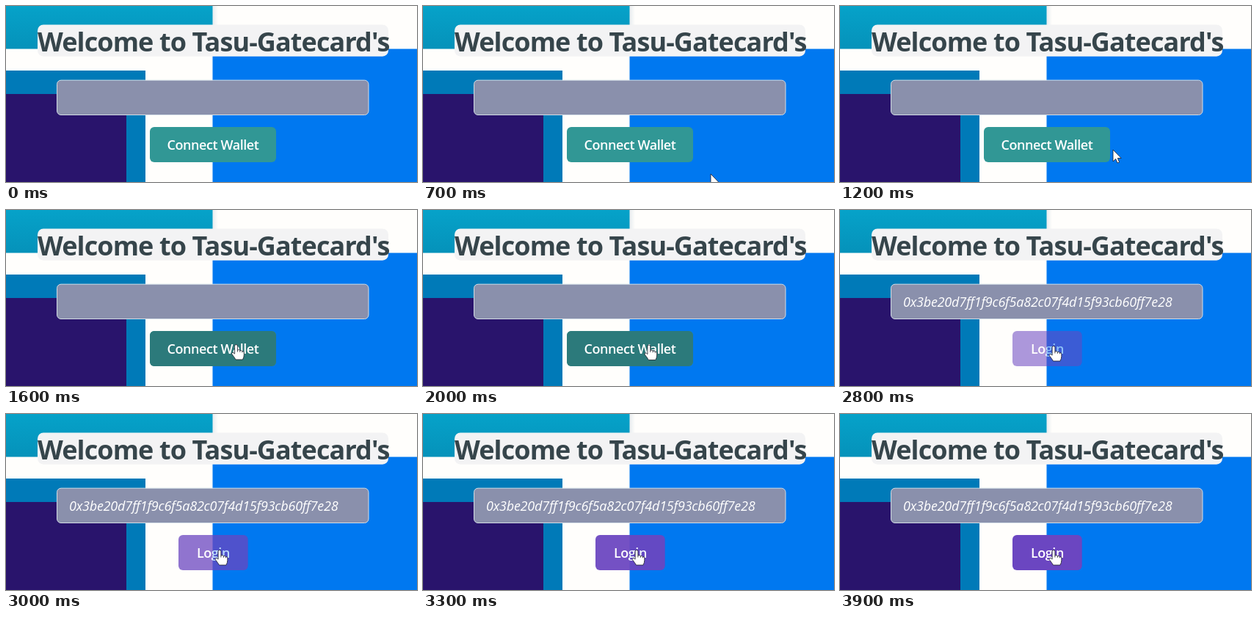
Animation of 560 by 240 pixels, one loop 4 s. Source, as an HTML page:

```html
<!DOCTYPE html>
<html lang="en">
<head>
<meta charset="utf-8">
<title>Connect and log in</title>
<style>
  html, body { margin: 0; width: 100%; height: 100%; overflow: hidden; background: #fffefc; }
  svg { display: block; }
  text { font: 600 18px "Open Sans", "Noto Sans", sans-serif; letter-spacing: -.024em; fill: #fff; }
  .mid { text-anchor: middle; }
  .title { font-size: 36px; font-weight: 700; letter-spacing: -.025em; fill: #36454b; }
  .address { font-weight: 400; font-style: italic; letter-spacing: -.012em; }
  .pointer { fill: #fff; stroke: #1b1b28; stroke-width: .8; stroke-linejoin: round; }
</style>
</head>
<body>
<svg width="560" height="240" viewBox="0 0 560 240">
  <defs>
    <linearGradient id="cyan" x2="0" y2="1">
      <stop stop-color="#06a2c9"/><stop offset="1" stop-color="#0592ba"/>
    </linearGradient>
    <linearGradient id="shade">
      <stop stop-color="#e6ebee"/><stop offset="1" stop-color="#fffefc"/>
    </linearGradient>
  </defs>

  <rect width="560" height="240" fill="#fffefc"/>
  <rect x="281" width="8" height="58" fill="url(#shade)"/>
  <rect width="281.5" height="58.5" fill="url(#cyan)"/>
  <rect x="281.5" y="58.5" width="279" height="182" fill="#0078f0"/>
  <rect y="88" width="190" height="152" fill="#007ab8"/>
  <rect y="120" width="164" height="120" fill="#29146c"/>

  <rect x="43" y="25.5" width="478" height="43.2" rx="8" fill="#f3f3f4"/>
  <text class="title" x="43" y="62">Welcome to Tasu-Gatecard's</text>

  <rect x="69.5" y="101.2" width="424.5" height="47.3" rx="5.5" fill="#8a90ac" stroke="#d3dde6"/>
  <text class="address" id="address" x="86" y="132">0x3be20d7ff1f9c6f5a82c07f4d15f93cb60ff7e28</text>

  <g id="connect">
    <rect x="196" y="165" width="172" height="48" rx="6" fill="#319795"/>
    <rect id="hover" x="196" y="165" width="172" height="48" rx="6" fill="#2c7a7b"/>
    <text class="mid" x="282" y="196">Connect Wallet</text>
  </g>
  <g id="login">
    <rect x="235" y="165" width="94.7" height="48" rx="6" fill="#6b46c1"/>
    <text class="mid" x="282.4" y="196">Login</text>
  </g>

  <g id="pointer" class="pointer">
    <path id="arrow" d="M0 0V16L3.7 12.5 6 18 8.6 17 6.3 11.6H11.2Z"/>
    <g id="hand">
      <path d="M-1.9 2Q-1.9 0 0 0T1.9 2V7.5Q4.5 6.3 5.3 8.2 7.6 7.3 8.3 9.2 10.8 8.6 10.8 11V14Q10.8 17 9 20.5H-.5Q-2.5 17-5.6 13.3-6.4 11.6-5 11-3.6 10.6-1.9 12.6Z"/>
      <path d="M1.9 7.5V10M5.3 8.2V10.4M8.3 9.2V10.8" fill="none"/>
    </g>
  </g>
</svg>
<script>
const LOOP = 4000, STEP = 100;
const ENTER = 700, HOVER = 1300, CONNECTED = 2330;
const path = [ // time, x, y
  [700, 392, 229], [1200, 372, 196], [1300, 357, 184], [1400, 338, 174],
  [1600, 313.5, 183.5], [1900, 313.5, 183.5], [2300, 291, 185.5], [4000, 291, 185.5],
];
const el = id => document.getElementById(id);
const show = (id, on) => el(id).style.display = on ? '' : 'none';
const progress = (t, start, length) => Math.min(1, Math.max(0, (t - start) / length));

function pointerAt(t) {
  const i = Math.max(1, path.findIndex(p => p[0] >= t));
  const [a, b] = [path[i - 1], path[i]];
  const u = progress(t, a[0], b[0] - a[0]);
  return [a[1] + (b[1] - a[1]) * u, a[2] + (b[2] - a[2]) * u];
}

function draw(now) {
  const t = Math.floor(now % LOOP / STEP) * STEP;
  const connected = t >= CONNECTED;
  show('address', connected);
  show('connect', !connected);
  show('login', connected);
  el('hover').setAttribute('opacity', progress(t, HOVER - STEP, 300));
  el('login').setAttribute('opacity', Math.sin(progress(t, CONNECTED, 1250) * Math.PI / 2));

  show('pointer', t >= ENTER);
  show('arrow', t < HOVER);
  show('hand', t >= HOVER);
  el('pointer').setAttribute('transform', `translate(${pointerAt(t)})`);
  requestAnimationFrame(() => draw(performance.now()));
}
draw(performance.now());
</script>
</body>
</html>
```
